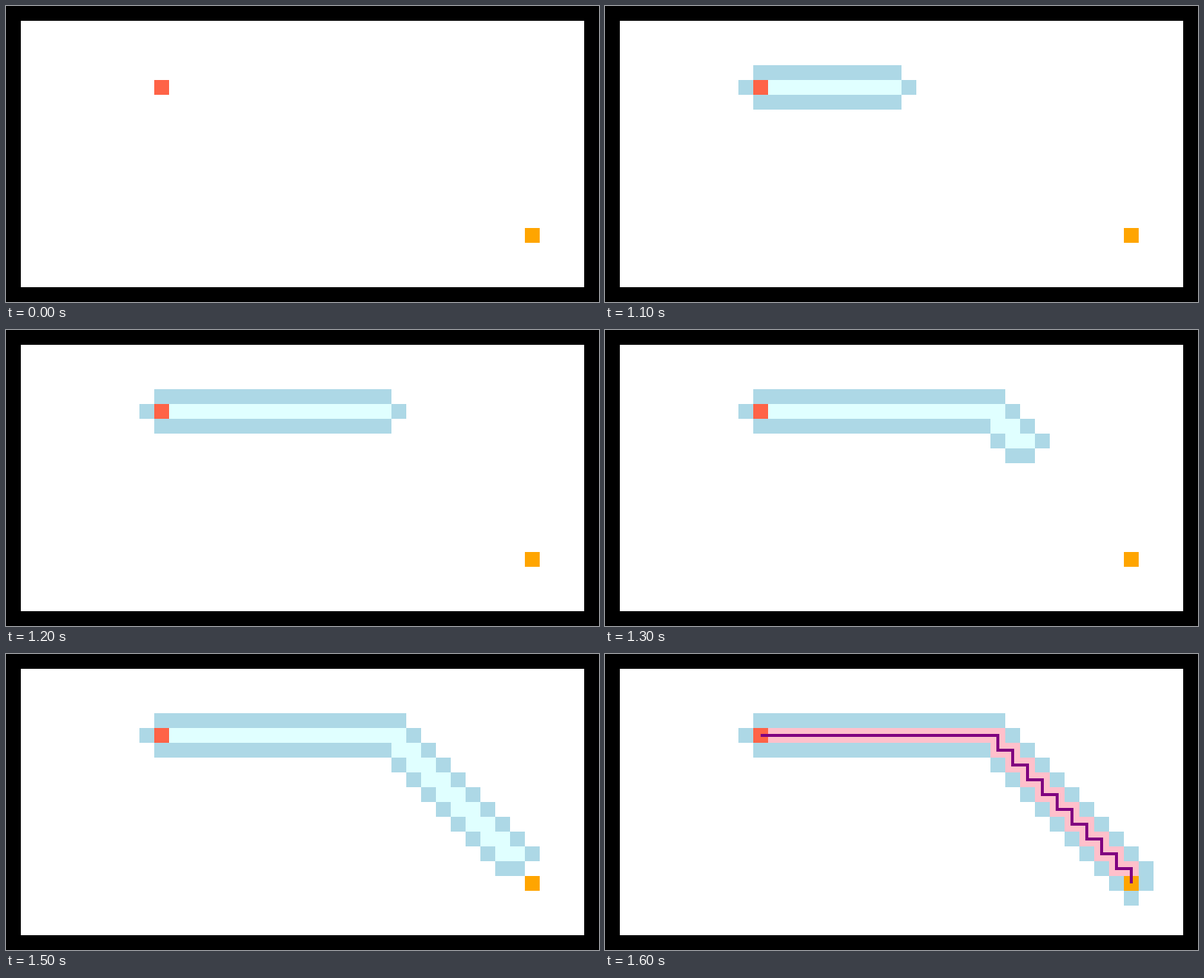
Write an HTML page with a canvas that moves like this. It is 800 px wide and 400 px high and loops after 2850 ms.

```html
<!DOCTYPE html>
<html lang="en">
<head>
<meta charset="utf-8">
<title>Grid path search</title>
<style>
  html, body { margin: 0; width: 100%; height: 100%; overflow: hidden; }
  canvas { display: block; }
</style>
</head>
<body>
<canvas id="stage" width="800" height="400"></canvas>
<script>
const ctx = document.getElementById("stage").getContext("2d");
const CELL = 20, LOOP = 2850, SEARCH_START = 1000, SEARCH_END = 1600, TICK = 50;

// Cells in the order they are expanded: a straight run, then a staircase.
const route = [];
for (let x = 10; x <= 26; x++) route.push([x, 5]);
for (let i = 1; i <= 9; i++) route.push([25 + i, 5 + i], [26 + i, 5 + i]);
route.push([35, 15]);
const start = route[0], goal = route[route.length - 1];

function fillCell([x, y], color) {
  ctx.fillStyle = color;
  ctx.fillRect(x * CELL, y * CELL, CELL, CELL);
}

function neighbours([x, y]) {
  return [[x - 1, y], [x + 1, y], [x, y - 1], [x, y + 1]];
}

function expandedCount(t) {
  if (t < SEARCH_START) return 0;
  if (t >= SEARCH_END) return route.length;
  const tick = Math.floor((t - SEARCH_START) / TICK);
  return Math.floor(4.6 + 2.85 * tick);
}

function drawRouteLine() {
  ctx.beginPath();
  for (const [x, y] of route) ctx.lineTo((x + 0.5) * CELL, (y + 0.5) * CELL);
  ctx.strokeStyle = "purple";
  ctx.lineWidth = 4;
  ctx.stroke();
}

function draw(t) {
  const found = t >= SEARCH_END;
  const expanded = route.slice(0, expandedCount(t));

  ctx.fillStyle = "black";
  ctx.fillRect(0, 0, 800, 400);
  ctx.fillStyle = "white";
  ctx.fillRect(CELL, CELL, 800 - 2 * CELL, 400 - 2 * CELL);

  expanded.flatMap(neighbours).forEach(cell => fillCell(cell, "lightblue"));
  expanded.forEach(cell => fillCell(cell, found ? "pink" : "lightcyan"));
  fillCell(start, "tomato");
  fillCell(goal, "orange");
  if (found) drawRouteLine();
}

const origin = performance.now();
function frame() {
  draw((performance.now() - origin) % LOOP);
  requestAnimationFrame(frame);
}
frame();
</script>
</body>
</html>
```
